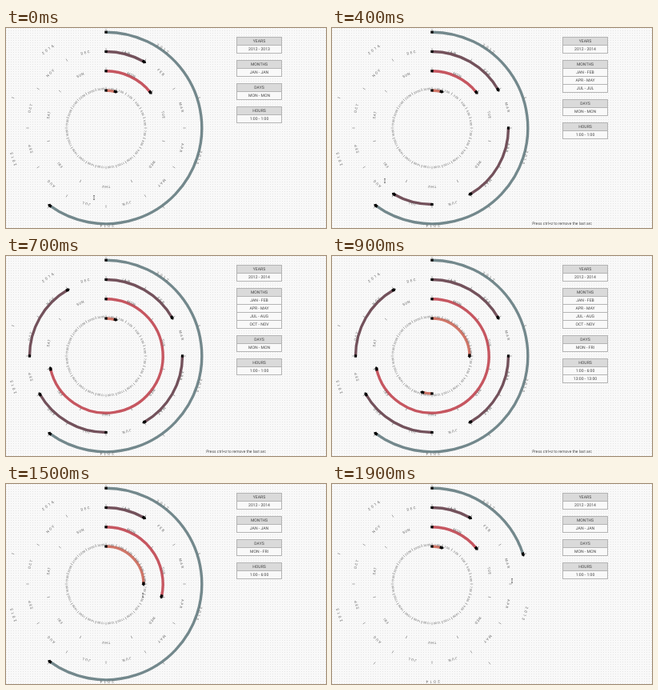
These frames come from a looping animation (400x250 px, 2000 ms). An HTML page:

```html
<!DOCTYPE html>
<html lang="en">
<head>
<meta charset="utf-8">
<title>Radial time range picker</title>
<style>
  html, body { margin: 0; width: 100%; height: 100%; overflow: hidden; }
  svg { display: block; width: 400px; height: 250px; }
  text { font-family: Roboto, Arial, sans-serif; fill: #444; text-anchor: middle;
         text-rendering: geometricPrecision; }
  #labels text { fill: #666; }
</style>
</head>
<body>
<svg viewBox="0 0 400 250">
  <defs>
    <pattern id="dots" width="3" height="3" patternUnits="userSpaceOnUse">
      <rect width="3" height="3" fill="#f9f9f9"/>
      <rect width="1" height="1" fill="#e5e5e5"/>
    </pattern>
  </defs>
  <rect width="400" height="250" fill="url(#dots)"/>
  <g id="arcs"></g>
  <g id="labels"></g>
  <g id="panel"></g>
  <g id="pointer"></g>
</svg>
<script>
const STEP = 100, STEPS = 20, CX = 125, CY = 125;
const $ = id => document.getElementById(id);

// Timelines map a step to the ranges valid from then on: "first-last", 1-based.
const rings = [
  { title: 'YEARS', radius: 119.8, color: '#73888c', size: 4.7, spacing: 2.2,
    names: ['2012', '2013', '2014', '2015', '2016'],
    arcs: { 0: '1-3', 19: '1-1' },
    rows: { 0: '1-2', 1: '1-3' } },
  { title: 'MONTHS', radius: 95.5, color: '#73515b', size: 4.4, spacing: 1.5,
    names: 'JAN FEB MAR APR MAY JUN JUL AUG SEP OCT NOV DEC'.split(' '),
    arcs: { 0: '1-1', 1: '1-2', 2: '1-2 4-4', 3: '1-2 4-5', 4: '1-2 4-5 7-7',
            5: '1-2 4-5 7-8', 6: '1-2 4-5 7-8 10-11', 11: '1-2 4-5 7-8',
            12: '1-2 4-5', 13: '1-2', 14: '1-1' } },
  { title: 'DAYS', radius: 71.2, color: '#c65660', size: 4.4, spacing: .6,
    names: 'MON TUE WED THU FRI SAT SUN'.split(' '),
    arcs: { 0: '1-1', 7: '1-5', 15: '1-2', 16: '1-1' },
    rows: { 0: '1-1', 8: '1-5', 16: '1-1' } },
  { title: 'HOURS', radius: 47, color: '#d17668', size: 3.6, spacing: 0,
    names: Array.from({ length: 24 }, (_, i) => `${i + 1}:00`),
    arcs: { 0: '1-1', 8: '1-6', 9: '1-6 13-13', 10: '1-6 13-18', 11: '1-6', 18: '1-1' },
    rows: { 0: '1-1', 8: '1-6', 9: '1-6 13-13', 10: '1-6 13-18', 11: '1-6', 19: '1-1' } }
];

// Step, x, y; the pointer is out of sight between the two paths.
const pointerPaths = [
  [[0, 110, 212], [1, 190, 62], [2, 200, 152], [3, 166, 199], [4, 66, 191], [5, 45, 170]],
  [[11, 108, 124], [12, 108, 124], [15, 171, 139], [19, 225, 121]]
];

function rangesAt(timeline, step) {
  const key = Object.keys(timeline).filter(k => k <= step).pop();
  return timeline[key].split(' ').map(range => range.split('-').map(Number));
}

function polar(radius, degrees) {
  const a = degrees * Math.PI / 180;
  return [CX + radius * Math.sin(a), CY - radius * Math.cos(a)];
}

function drawLabels() {
  $('labels').innerHTML = rings.map((ring, i) => {
    const r = ring.radius + .8, sector = 360 / ring.names.length;
    const path = `<path id="ring${i}" fill="none" d="M${CX},${CY + r}
      A${r},${r} 0 0 1 ${CX},${CY - r} A${r},${r} 0 0 1 ${CX},${CY + r}"/>`;
    return path + ring.names.map((name, k) => `
      <path d="M${CX},${CY - r}v-3.5" stroke="#777" stroke-width=".6"
        transform="rotate(${k * sector} ${CX} ${CY})"/>
      <text font-size="${ring.size}" letter-spacing="${ring.spacing}"
        transform="rotate(${(k + .5) * sector} ${CX} ${CY})">
        <textPath href="#ring${i}" startOffset="50%">${name}</textPath></text>`).join('');
  }).join('');
}

function drawArc(ring, [first, last]) {
  const r = ring.radius, sector = 360 / ring.names.length;
  const from = (first - 1) * sector, to = last * sector;
  const handle = (degrees, points) => `<polygon points="${points}"
    transform="translate(${polar(r, degrees)}) rotate(${degrees})"/>`;
  return `<path d="M${polar(r, from)}A${r},${r} 0 ${+(to - from > 180)} 1 ${polar(r, to)}"
      fill="none" stroke="${ring.color}" stroke-width="3.4"/>` +
    handle(from, '-1.7,-1.6 1.7,-1.6 1.7,1.6 -1.7,1.6') +
    handle(to, '-2.5,-1.7 0,-1.7 0,-2.6 2.8,0 0,2.6 0,1.7 -2.5,1.7');
}

function drawPanel(step) {
  let top = 11.5;
  const box = (y, height, fill) => `<rect x="288.5" y="${y}" width="56" height="${height}"
    fill="${fill}" stroke="#b4b4b4"/>`;
  const line = (y, label) => `<text x="316.5" y="${y}" font-size="5.1">${label}</text>`;
  let html = '';
  for (const ring of rings) {
    const rows = rangesAt(ring.rows || ring.arcs, step);
    html += box(top, 10, '#dadada') + line(top + 6.7, ring.title);
    rows.forEach(([a, b], i) => {
      const y = top + 10 * (i + 1);
      html += box(y, 10, '#f9f9f9') +
        line(y + 6.8, `${ring.names[a - 1]} - ${ring.names[b - 1]}`);
    });
    top += 10 * rows.length + 19;
  }
  if (step >= 2 && step <= 13)
    html += '<text x="287.5" y="245.5" font-size="4.95">Press ctrl+z to remove the last arc</text>';
  $('panel').innerHTML = html;
}

function drawPointer(step) {
  const path = pointerPaths.find(p => step >= p[0][0] && step <= p[p.length - 1][0]);
  if (!path) return $('pointer').innerHTML = '';
  const i = Math.max(1, path.findIndex(p => p[0] >= step));
  const [a, b] = [path[i - 1], path[i]], mix = (step - a[0]) / (b[0] - a[0]);
  const at = k => a[k] + (b[k] - a[k]) * mix;
  const shape = step === 11 || step === 12
    ? '<path d="M-1,-2v4l1,-1l1,1.5l.8,-.5l-.8,-1.5h1.2z"/>'
    : '<path d="M-1,-2.5h2M0,-2.5v5M-1,2.5h2" stroke="#444" stroke-width=".6"/>';
  $('pointer').innerHTML = `<g transform="translate(${at(1)} ${at(2)})">${shape}</g>`;
}

let shown = -1;
function render(now) {
  const step = Math.floor(now / STEP) % STEPS;
  if (step !== shown) {
    shown = step;
    $('arcs').innerHTML = rings.map(ring =>
      rangesAt(ring.arcs, step).map(range => drawArc(ring, range)).join('')).join('');
    drawPanel(step);
    drawPointer(step);
  }
}

drawLabels();
const start = performance.now();
render(0);
requestAnimationFrame(function tick() {
  render(performance.now() - start);
  requestAnimationFrame(tick);
});
</script>
</body>
</html>
```
